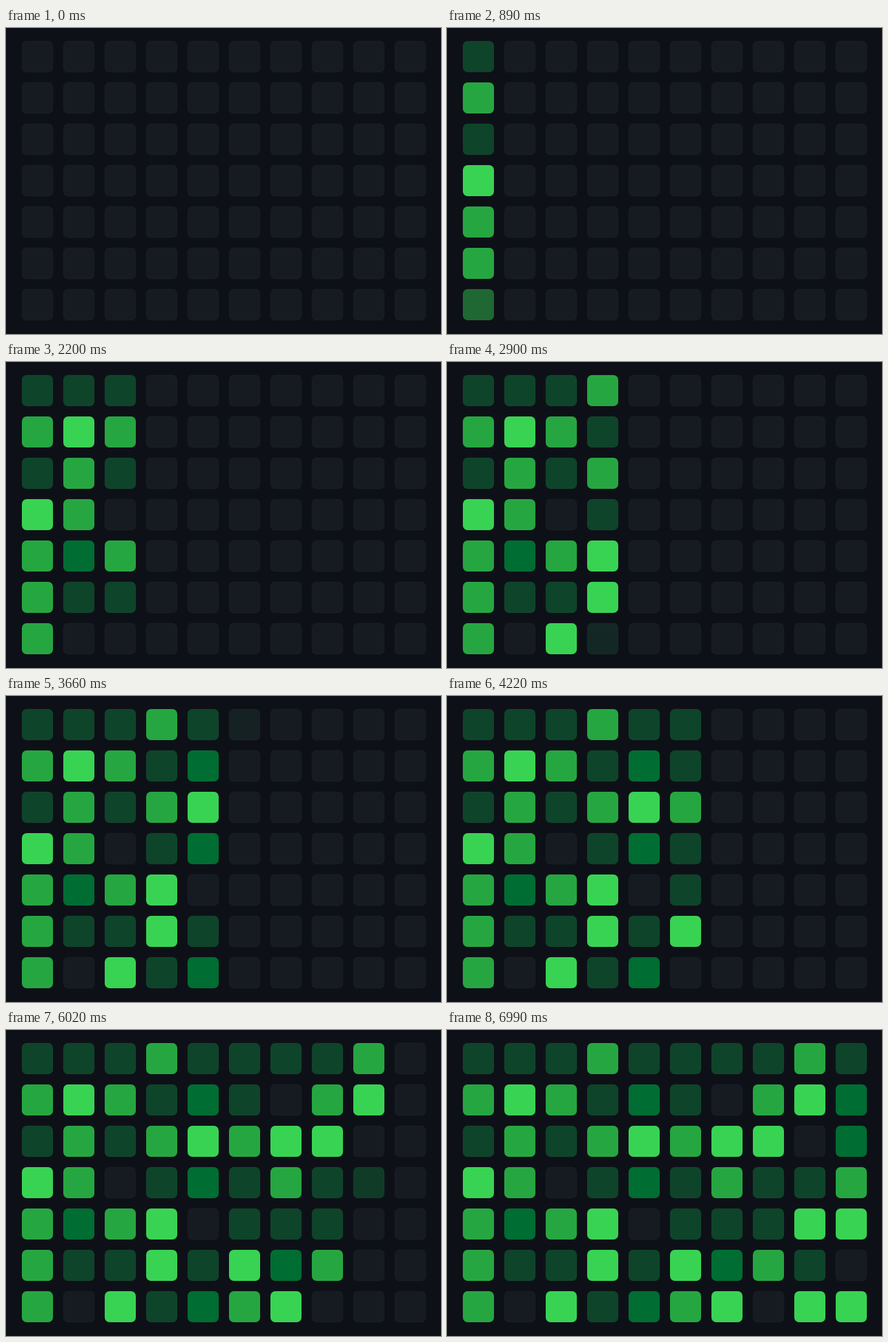
Recreate the animation shown at these times as an HTML page. Size 630 by 444 pixels, loop 7190 ms.

```html
<!DOCTYPE html>
<html lang="en">
<head>
<meta charset="utf-8">
<title>Activity grid</title>
<style>
  html, body {
    margin: 0;
    width: 100%;
    height: 100%;
    overflow: hidden;
    background: #0d1117;
  }
  svg { display: block; }
  rect {
    fill: #161b22;
    stroke: rgba(255, 255, 255, .02);
    stroke-width: 1.5px;
  }
</style>
</head>
<body>
<svg id="grid" width="630" height="444" viewBox="0 0 630 444"></svg>
<script>
const LOOP = 7190, FADE = 27, ROWS = 7, PITCH = 60, SIZE = 45;
const COLORS = [[22, 27, 34], [14, 68, 41], [0, 109, 50], [38, 166, 65], [57, 211, 83]];

// One string per column, top to bottom: index into COLORS.
const COLUMNS = [
  '1314333', '1433210', '1310314', '3131441', '1242012',
  '1131143', '1043124', '1341130', '3401414', '1223404'
];

// Pace of the sweep: [cell index, start time in ms].
const PACE = [[0, 300], [6, 876], [14, 1650], [35, 3657], [47, 4840], [59, 6000], [69, 6964]];

function startOf(i) {
  const k = Math.max(1, PACE.findIndex(p => p[0] >= i));
  const [i0, t0] = PACE[k - 1], [i1, t1] = PACE[k];
  return t0 + (t1 - t0) * (i - i0) / (i1 - i0);
}

function makeCell(level, i) {
  const el = document.createElementNS('http://www.w3.org/2000/svg', 'rect');
  const attrs = {
    x: 23 + PITCH * Math.floor(i / ROWS),
    y: 19 + PITCH * (i % ROWS),
    width: SIZE, height: SIZE, rx: 7
  };
  for (const name in attrs) el.setAttribute(name, attrs[name]);
  document.getElementById('grid').append(el);
  return { el, color: COLORS[level], start: startOf(i), shown: 0 };
}

const cells = [...COLUMNS.join('')].map(makeCell);

function draw(now) {
  const t = now % LOOP;
  for (const cell of cells) {
    const p = Math.min(1, Math.max(0, (t - cell.start) / FADE));
    if (p === cell.shown) continue;
    cell.shown = p;
    const rgb = COLORS[0].map((v, k) => Math.round(v + (cell.color[k] - v) * p));
    cell.el.style.fill = `rgb(${rgb})`;
  }
}

const begin = performance.now();
function tick() {
  draw(performance.now() - begin);
  requestAnimationFrame(tick);
}
tick();
</script>
</body>
</html>
```
